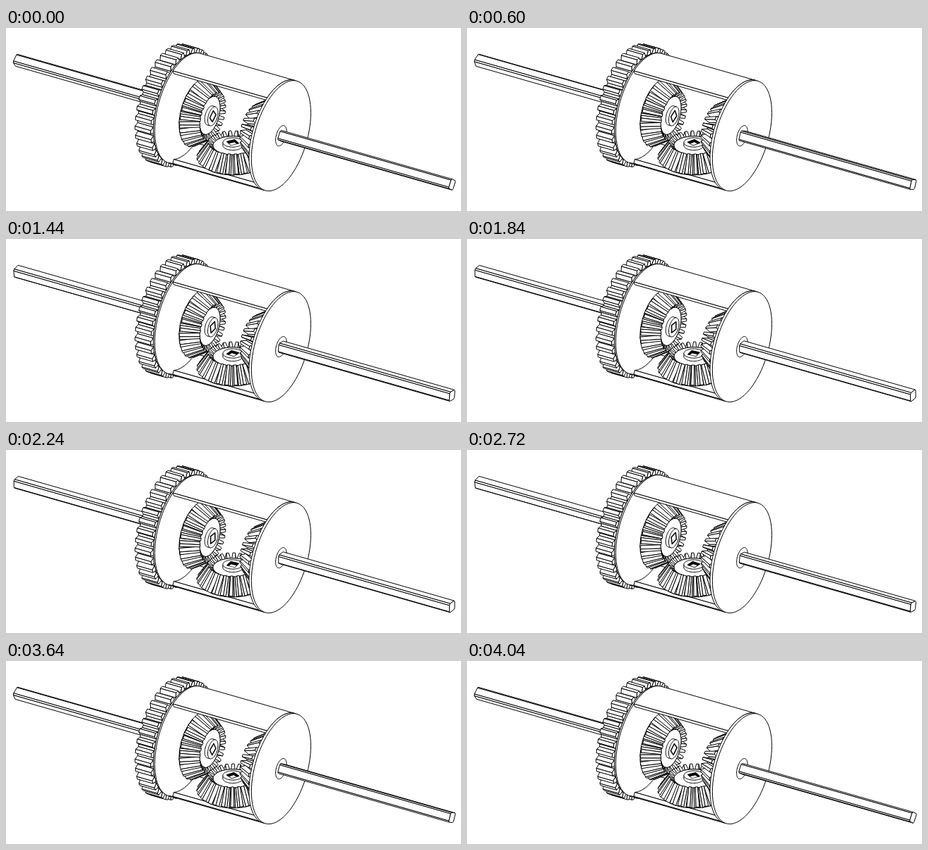
An HTML page with a canvas that plays this animation: 644 px wide and 260 px high, repeating every 4.08 s.

```html
<!DOCTYPE html>
<html lang="en">
<head>
<meta charset="utf-8">
<title>Differential gear</title>
<style>
  html, body { margin: 0; width: 100%; height: 100%; overflow: hidden; background: #fff; }
  canvas { display: block; width: 644px; height: 260px; }
</style>
</head>
<body>
<canvas id="stage" width="644" height="260"></canvas>
<script>
const ctx = document.getElementById('stage').getContext('2d');
const TAU = Math.PI * 2, DEG = Math.PI / 180;
const FRAME = 40, COUNT = 102, SPEED = 0.8;

// Model axes: X along the shafts, Y to the rear, Z up
const VIEW = [0.457, -0.755, 0.472];
const X = [1, 0, 0], Y = [0, 1, 0], Z = [0, 0, 1];
const neg = a => a.map(n => -n);
const dot = (a, b) => a[0] * b[0] + a[1] * b[1] + a[2] * b[2];
const sub = (a, b) => a.map((n, i) => n - b[i]);
const cross = (a, b) => [
  a[1] * b[2] - a[2] * b[1],
  a[2] * b[0] - a[0] * b[2],
  a[0] * b[1] - a[1] * b[0]
];
const mean = pts => X.map((_, i) => pts.reduce((s, p) => s + p[i], 0) / pts.length);
const project = ([x, y, z]) => [
  321 + 0.855 * x + 0.519 * y,
  133.5 + 0.245 * x - 0.403 * y - 0.881 * z
];

const LEFT = { u: Y, v: Z, axis: neg(X) };
const RIGHT = { u: Y, v: Z, axis: X };
const SPIDER = { u: X, v: Y, axis: neg(Z) };

// Cylindrical coordinates in a part's own axes
const at = (f, r, h, a) => X.map((_, i) =>
  f.u[i] * r * Math.cos(a) + f.v[i] * r * Math.sin(a) + f.axis[i] * h);
const ring = (f, r, h, n = 72, a = 0) =>
  Array.from({ length: n }, (_, i) => at(f, r, h, a + i * TAU / n));

function trace(pts) {
  ctx.beginPath();
  pts.forEach(p => ctx.lineTo(...p));
  ctx.closePath();
}

function shape(pts) {
  trace(pts);
  ctx.fill();
  ctx.stroke();
}

const solid = pts => shape(pts.map(project));

function line(...pts) {
  ctx.beginPath();
  pts.forEach(p => ctx.lineTo(...p));
  ctx.stroke();
}

// Each face carries a point inside its body, so hidden sides can be dropped
function paint(faces) {
  faces
    .map(([pts, inside]) => ({ pts, inside, mid: mean(pts) }))
    .filter(({ pts, inside, mid }) => {
      const n = cross(sub(pts[1], pts[0]), sub(pts[2], pts[0]));
      return dot(n, sub(mid, inside)) * dot(n, VIEW) > 0;
    })
    .sort((a, b) => dot(a.mid, VIEW) - dot(b.mid, VIEW))
    .forEach(face => solid(face.pts));
}

function gear(f, teeth, turn, near, far) {
  const pitch = TAU / teeth, faces = [];
  const core = at(f, 0, (near.rootH + far.rootH) / 2 + (far.tip - near.tip) * 0.6, 0);
  for (let i = 0; i < teeth; i++) {
    const a = turn + i * pitch;
    const edge = (k, s) => [
      at(f, k.root, k.rootH, a + s * pitch * 0.36),
      at(f, k.tip, k.tipH, a + s * pitch * 0.18)
    ];
    const [n0, n1] = edge(near, -1), [n2, n3] = edge(near, 1);
    const [f0, f1] = edge(far, -1), [f2, f3] = edge(far, 1);
    const inside = mean([n0, n1, n2, n3, f0, f1, f2, f3]);
    const next = a + pitch * 0.64;
    faces.push(
      [[n1, n3, f3, f1], inside],
      [[n0, n1, f1, f0], inside],
      [[n2, n3, f3, f2], inside],
      [[n0, n1, n3, n2], inside],
      [[f0, f1, f3, f2], inside],
      [[n2, at(f, near.root, near.rootH, next), at(f, far.root, far.rootH, next), f2], core]
    );
  }
  const middle = at(f, 0, (near.rootH + far.rootH) / 2, 0);
  faces.push([ring(f, near.root, near.rootH), middle]);
  faces.push([ring(f, far.root, far.rootH), middle]);
  paint(faces);
}

const SMALL = { tip: 35, tipH: 33, root: 28, rootH: 38 };
const LARGE = { tip: 51, tipH: 57, root: 46, rootH: 61 };
const bevel = (f, turn) => gear(f, 24, turn, SMALL, LARGE);

function hub(f, corner, depth) {
  const base = 38, top = 33, r = 14;
  solid(ring(f, r, base));
  // Straight sides join the two rims where they meet the outline
  const side = Math.atan2(dot(f.v, VIEW), dot(f.u, VIEW)) + Math.PI / 2;
  const [a, b, c, d] = [
    at(f, r, base, side), at(f, r, top, side),
    at(f, r, top, side + Math.PI), at(f, r, base, side + Math.PI)
  ].map(project);
  trace([a, b, c, d]);
  ctx.fill();
  line(a, b);
  line(c, d);
  solid(ring(f, r, top));

  const hole = ring(f, 8.5, top, 4, corner).map(project);
  ctx.save();
  ctx.lineWidth = 1.5;
  ctx.fillStyle = depth ? '#000' : '#fff';
  shape(hole);
  if (depth) {
    trace(hole);
    ctx.clip();
    ctx.fillStyle = '#fff';
    solid(ring(f, 8.5, top + depth, 4, corner));
  }
  ctx.restore();
}

// Square shaft with narrow chamfers along its corners
function bar(from, to, corner) {
  const section = x => [0, 1, 2, 3].flatMap(i =>
    [-9, 9].map(c => at(RIGHT, 8.8, x, corner + i * TAU / 4 + c * DEG)));
  const a = section(from), b = section(to);
  const inside = [(from + to) / 2, 0, 0];
  const faces = a.map((p, i) => {
    const j = (i + 1) % a.length;
    return [[p, a[j], b[j], b[i]], inside];
  });
  paint([...faces, [b, inside]]);
}

const CAGE = { left: -80, right: 76, face: 80, outer: 81, inner: 75 };

// Part of a cylinder wall between the two discs
function wall(r, from, to) {
  const arc = (x, a, b) => Array.from({ length: 13 }, (_, i) =>
    at(RIGHT, r, x, (a + (b - a) * i / 12) * DEG));
  solid([...arc(CAGE.left, from, to), ...arc(CAGE.right, to, from)]);
}

function cutFace(angle) {
  const { left, right, outer, inner } = CAGE, a = angle * DEG;
  solid([at(RIGHT, outer, left, a), at(RIGHT, outer, right, a),
    at(RIGHT, inner, right, a), at(RIGHT, inner, left, a)]);
}

function draw(step) {
  const turn = step * SPEED * DEG;
  const leftCorner = 82 * DEG - turn;
  const rightCorner = 9 * DEG + turn;

  ctx.fillStyle = '#fff';
  ctx.fillRect(0, 0, 644, 260);
  ctx.strokeStyle = '#000';
  ctx.lineWidth = 1;
  ctx.lineJoin = 'round';

  bar(-358, -100, leftCorner);
  gear(RIGHT, 36, 0,
    { tip: 87, tipH: -109, root: 80, rootH: -109 },
    { tip: 87, tipH: -83, root: 80, rootH: -83 });
  solid(ring(RIGHT, CAGE.outer, CAGE.left));

  // Lower strut
  wall(CAGE.inner, 247, 293);
  wall(CAGE.outer, 238, 247);
  cutFace(247);

  bevel(LEFT, -turn);
  hub(LEFT, leftCorner, 0);
  bevel(SPIDER, turn + 7.5 * DEG);
  hub(SPIDER, 13.6 * DEG + turn, 3);
  bevel(RIGHT, turn);

  // Upper strut
  wall(CAGE.outer, 113, 58);
  cutFace(113);

  solid(ring(RIGHT, CAGE.outer, CAGE.right));
  solid(ring(RIGHT, CAGE.outer, CAGE.face));
  solid(ring(RIGHT, 15, CAGE.face));
  bar(CAGE.face, 363, rightCorner);
}

function tick(now) {
  const frame = Math.floor(now / FRAME) % COUNT;
  // The motion runs forward, then back
  draw(Math.min(frame, COUNT - 1 - frame));
  requestAnimationFrame(tick);
}

draw(0);
requestAnimationFrame(tick);
</script>
</body>
</html>
```
